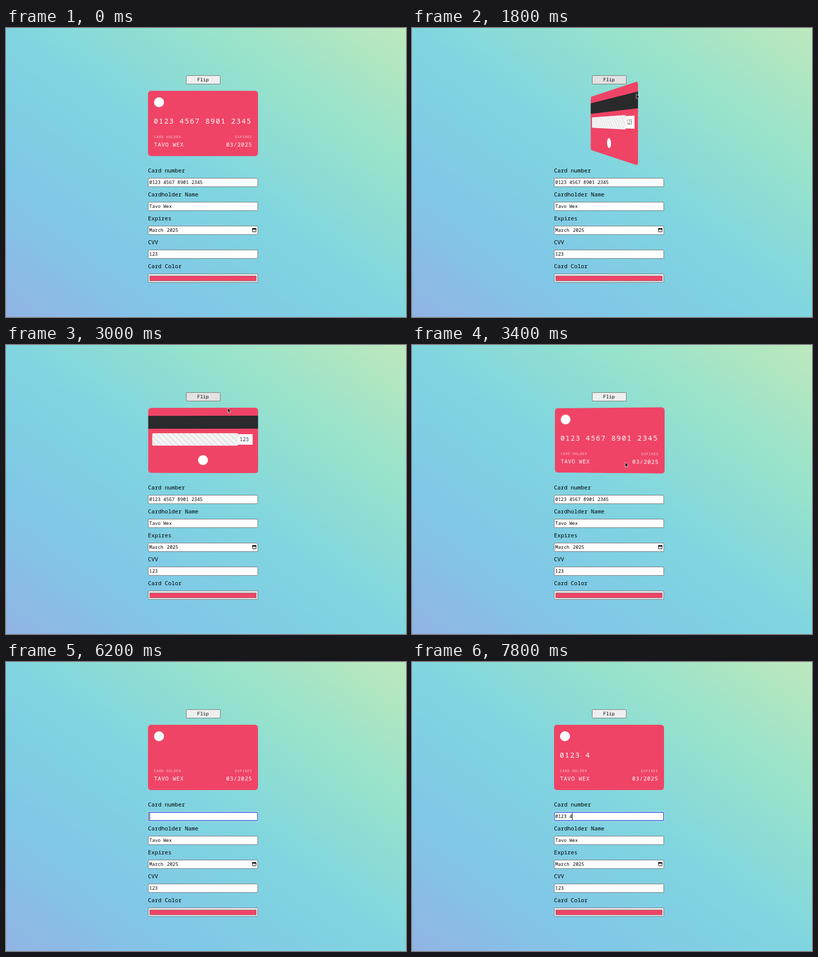
An HTML page for the animation above (8 s loop, 800x580 px).

```html
<!DOCTYPE html>
<html lang="en">
<head>
<meta charset="utf-8">
<title>Card preview form</title>
<style>
@property --typed { syntax: "<integer>"; inherits: true; initial-value: 19; }

* { box-sizing: border-box; }
html, body { margin: 0; width: 100%; height: 100%; overflow: hidden; }
body {
  --loop: 8s infinite;
  --accent: #ef4466;
  font-family: "Noto Sans Mono", "Liberation Mono", monospace;
  color: #000;
}
.stage {
  position: relative; width: 800px; height: 580px; overflow: hidden;
  background: linear-gradient(to top right, #91b4e5, #80c8e7 25%, #80d5e0 50%, #98e3cb 75%, #bde8bd);
  animation: typing var(--loop);
}
.stage div, .stage svg { position: absolute; white-space: pre; }

/* Button */
.flip {
  left: 359.5px; top: 94.5px; width: 69px; height: 18px;
  border: 1px solid #767676; border-radius: 2px; background: #efefef;
  font-size: 9.5px; line-height: 16px; text-align: center;
  animation: hover var(--loop) step-end;
}

/* Card */
.scene { left: 284px; top: 126px; width: 220px; height: 131px; perspective: 440px; }
.card { inset: 0; transform-style: preserve-3d; animation: flip var(--loop) cubic-bezier(.175, .885, .32, 1.275); }
.face {
  inset: 0; border-radius: 6px; overflow: hidden; color: #fff;
  background: var(--accent); backface-visibility: hidden;
}
.back { transform: rotateY(180deg); }
.logo { width: 20px; height: 20px; border-radius: 50%; background: #fff; }
.front .logo { left: 12px; top: 13px; }
.back .logo { left: 100px; top: 95px; }
.number {
  left: 11.5px; top: 51px; width: calc(var(--typed) * 10.33px); overflow: hidden;
  font-size: 14.4px; line-height: 20px; letter-spacing: 1.69px;
}
.caption { top: 88px; font-size: 6.7px; line-height: 10px; letter-spacing: .93px; opacity: .72; }
.value { top: 100px; font-size: 11.2px; line-height: 16px; letter-spacing: .75px; }
.start { left: 12px; }
.end { right: 11.5px; }
.stripe { left: 0; top: 16px; width: 100%; height: 26px; background: #2a2a2c; }
.code {
  left: 178px; top: 52.5px; width: 31px; height: 21px; padding-left: 5px;
  background: #fff; color: #333; font-size: 10.3px; line-height: 21px;
}
.signature {
  left: 8px; top: 50.5px; width: 172px; height: 25px; border-radius: 3px;
  background: repeating-linear-gradient(45deg, #f8f8f8 0 4px, #e8e8e8 4px 8px);
}

/* Form */
.row { left: 284px; top: var(--y); width: 220px; height: 36px; }
.label { left: 0; top: 0; font-size: 11.2px; line-height: 16px; }
.field {
  left: 0; top: 23px; width: 220px; height: 18px; padding-left: 1.5px;
  border: 1px solid #767676; border-radius: 2px; background: #fff;
  font-size: 9.4px; line-height: 16px;
}
.focusable { animation: focus var(--loop) step-end; }
.entry {
  left: 1.5px; top: 1px; height: 14px; line-height: 14px; overflow: hidden;
  box-sizing: content-box; width: calc(var(--typed) * 1ch);
  border-right: 1px solid transparent; animation: caret var(--loop) step-end;
}
.month { word-spacing: 1.5px; }
.month svg { right: 2px; top: 3px; }
.picker { background: #efefef; }
.swatch { left: 2px; top: 3px; width: 214px; height: 11px; border: 1px solid #8a7078; background: var(--accent); }

/* Pointer */
.pointer { left: 0; top: 0; animation: move var(--loop) ease-in-out, leave var(--loop) step-end; }
.pointer svg { overflow: visible; }
.arrow { animation: arrow var(--loop) step-end; }
.beam { animation: beam var(--loop) step-end; }

@keyframes flip {
  0%, 20.5625% { transform: rotateY(0deg); }
  33.0625%, 37.5% { transform: rotateY(180deg); }
  50%, 100% { transform: rotateY(0deg); }
}
@keyframes typing {
  0% { --typed: 19; }
  62.5% { --typed: 19; animation-timing-function: steps(19); }
  76.25% { --typed: 0; }
  81.25% { --typed: 0; animation-timing-function: steps(6); }
  96.875%, 100% { --typed: 6; }
}
@keyframes hover {
  0% { background: #efefef; }
  18% { background: #e2e2e2; }
  38.6% { background: #efefef; }
}
@keyframes focus {
  0% { border-color: #767676; box-shadow: none; }
  53%, 100% { border-color: #1d4fdc; box-shadow: inset 0 0 0 .5px #1d4fdc, 0 0 0 1px #ffffff99; }
}
@keyframes caret {
  0% { border-color: transparent; }
  53% { border-color: #000; }
  59.25% { border-color: transparent; }
  62.5%, 100% { border-color: #000; }
}
@keyframes move {
  0%, 10% { transform: translate(810px, 190px); }
  18.75%, 24% { transform: translate(410px, 110px); }
  33%, 38% { transform: translate(405px, 104px); }
  42.5% { transform: translate(388px, 213px); }
  52%, 100% { transform: translate(425px, 313px); }
}
@keyframes leave { 0% { opacity: 1; } 62.5%, 100% { opacity: 0; } }
@keyframes arrow { 0% { opacity: 1; } 50.5%, 100% { opacity: 0; } }
@keyframes beam { 0% { opacity: 0; } 50.5%, 100% { opacity: 1; } }
</style>
</head>
<body>
<div class="stage">
  <div class="flip">Flip</div>

  <div class="scene">
    <div class="card">
      <div class="face front">
        <div class="logo"></div>
        <div class="number">0123 4567 8901 2345</div>
        <div class="caption start">CARD HOLDER</div>
        <div class="value start">TAVO WEX</div>
        <div class="caption end">EXPIRES</div>
        <div class="value end">03/2025</div>
      </div>
      <div class="face back">
        <div class="stripe"></div>
        <div class="code">123</div>
        <div class="signature"></div>
        <div class="logo"></div>
      </div>
    </div>
  </div>

  <div class="row" style="--y: 278px">
    <div class="label">Card number</div>
    <div class="field focusable"><div class="entry">0123 4567 8901 2345</div></div>
  </div>
  <div class="row" style="--y: 326px">
    <div class="label">Cardholder Name</div>
    <div class="field">Tavo Wex</div>
  </div>
  <div class="row" style="--y: 374px">
    <div class="label">Expires</div>
    <div class="field month">March 2025<svg width="9" height="9"><path d="M1 1.5h7v6.5h-7z" fill="none" stroke="#000"/><path d="M.5 1h8v2.4h-8zM2 0h1v1.5h-1zM6 0h1v1.5h-1z"/></svg></div>
  </div>
  <div class="row" style="--y: 422px">
    <div class="label">CVV</div>
    <div class="field">123</div>
  </div>
  <div class="row" style="--y: 470px">
    <div class="label">Card Color</div>
    <div class="field picker"><div class="swatch"></div></div>
  </div>

  <div class="pointer">
    <svg class="arrow" width="8" height="12"><path d="M.4 .4v9.2l2.1-1.9 1.5 3.4 1.6-.7-1.5-3.3h2.8z" stroke="#fff" stroke-width=".7"/></svg>
    <svg class="beam" width="5" height="10"><path d="M-2-4.5q2 0 2 1.2 0-1.2 2-1.2M0-3.3v7.2M-2 5q2 0 2-1.1 0 1.1 2 1.1M-1 1.8h2" fill="none" stroke="#222"/></svg>
  </div>
</div>
</body>
</html>
```
